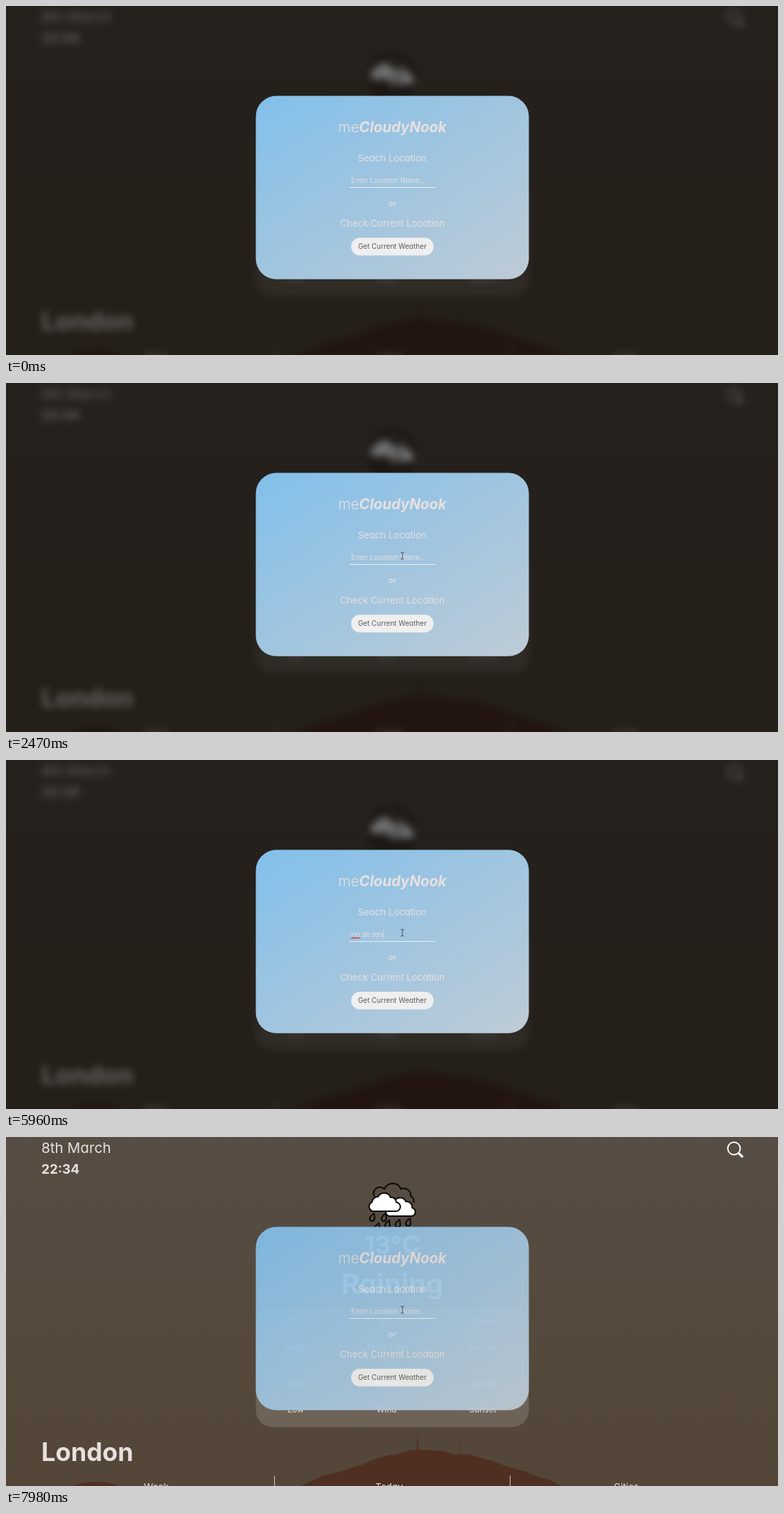
These frames come from a looping animation (1114 px wide and 503 px high, 8 s). An HTML page:

```html
<!DOCTYPE html>
<html lang="en">
<head>
<meta charset="utf-8">
<title>Weather search</title>
<style>
  html, body { margin: 0; width: 100%; height: 100%; overflow: hidden; background: #25211d; }
  svg { display: block; width: 100%; height: 100%; }
  /* cv11 is the round single-storey "a" */
  text { font-family: Inter, "Open Sans", sans-serif; font-feature-settings: "cv11"; fill: #e8e0df; white-space: pre; }
  .mid { text-anchor: middle; }
  .bold { font-weight: 700; }
  .dimmed { filter: blur(5.5px) brightness(.43); }
  .outline { stroke: #0b0908; stroke-width: 2; stroke-linejoin: round; }
</style>
</head>
<body>
<svg viewBox="0 0 1114 503">
  <defs>
    <linearGradient id="dusk" x2="0" y2="1">
      <stop stop-color="#574d44"/><stop offset="1" stop-color="#534637"/>
    </linearGradient>
    <linearGradient id="sky" x2="1" y2="1">
      <stop stop-color="#82bfea"/><stop offset="1" stop-color="#becbd5"/>
    </linearGradient>
    <path id="drop" d="M3-6C-2-2-4 0-3 3-1 7 4 5 4 1z"/>
  </defs>

  <g id="scene">
    <rect x="-40" y="-40" width="1194" height="583" fill="url(#dusk)"/>
    <g fill="#502f23">
      <path d="M425 543V503L440 496 458 488 476 484 495 478 512 473 530 465 550 459 566 457 575 453 590 451 612 451 632 453 645 457 668 457 690 464 700 466 715 472 730 477 750 482 768 490 785 494 800 503V543z"/>
      <path d="M95 543V503Q134 490 162 503V543z"/>
      <path d="M592.5 452L593.3 427H594.2L595.5 452zM654 458V441H655V458z" opacity=".8"/>
    </g>
    <text x="51" y="23" font-size="20.7">8th March</text>
    <text x="51" y="53" font-size="18.9" class="bold">22:34</text>
    <g fill="none" stroke="#fff" stroke-linecap="round">
      <circle cx="1050.5" cy="16.5" r="9" stroke-width="2"/>
      <path d="M1058 24L1062.3 28.2" stroke-width="3.2"/>
    </g>
    <g class="outline" fill="none">
      <path d="M533 88a9 9 0 0 1 13-13a13 13 0 0 1 24 0a10 10 0 0 1 14 10a8 8 0 0 1 4 10"/>
      <path fill="#fff" d="M553 114a6 6 0 0 1-2-11a8 8 0 0 1 9-9a9 9 0 0 1 17-1a8 8 0 0 1 9 9a6.2 6.2 0 0 1 0 12z"/>
      <path fill="#fff" d="M529 107a7 7 0 0 1-1-13a9 9 0 0 1 9-8a10 10 0 0 1 18 1a7 7 0 0 1 8 7a6.5 6.5 0 0 1-1 13z"/>
      <use href="#drop" x="528" y="116"/><use href="#drop" x="545" y="116"/>
      <use href="#drop" x="535" y="130"/><use href="#drop" x="550" y="126"/>
      <use href="#drop" x="565" y="125"/><use href="#drop" x="580" y="123"/>
    </g>
    <text x="557" y="168" font-size="36" class="mid bold">13°C</text>
    <text x="557.5" y="226" font-size="39.8" class="mid bold">Raining</text>
    <rect x="360.5" y="245" width="394" height="173" rx="24" fill="#fff" opacity=".15"/>
    <g id="details" font-size="12" class="mid"></g>
    <text x="51" y="467" font-size="36.2" class="bold">London</text>
    <g font-size="13.5" class="mid">
      <text x="217" y="509">Week</text><text x="553" y="509">Today</text><text x="895" y="509">Cities</text>
    </g>
    <path d="M387.5 488V543M727.5 488V543" stroke="#d2c9c4"/>
  </g>

  <g id="card">
    <rect x="360.5" y="129.5" width="394" height="264.3" rx="29.5" fill="url(#sky)"/>
    <text x="557.5" y="182" font-size="20.8" class="mid"><tspan font-weight="300">me</tspan><tspan class="bold" font-style="italic">CloudyNook</tspan></text>
    <text x="557.5" y="223.7" font-size="13.4" class="mid">Seach Location</text>
    <text id="hint" x="498" y="254.7" font-size="9.95">Enter Location Name...</text>
    <text id="typed" x="498" y="254.7" font-size="10.3"></text>
    <rect id="spelling" x="498" y="255.6" height="1.6" fill="#dc4038"/>
    <rect id="caret" y="244" width=".8" height="14" fill="#e8e0df"/>
    <rect x="495.5" y="261" width="124.5" height="1" fill="#f0eeee"/>
    <text x="557.5" y="287.5" font-size="11" font-weight="500" class="mid">or</text>
    <text x="557.5" y="317.6" font-size="13.4" class="mid">Check Current Location</text>
    <rect x="498" y="334" width="119" height="25.5" rx="12.75" fill="#efefef"/>
    <text x="557.5" y="350.4" font-size="10.1" class="mid" style="fill:#5c5c5c">Get Current Weather</text>
  </g>

  <circle id="click" cx="570" cy="248" r="8.3" fill="none" stroke="#444" stroke-width="1.2"/>
  <g id="pointer">
    <path id="arrow" d="M.5.5V10L2.7 8 4.2 11.4 5.6 10.8 4.2 7.5H7z" fill="#111" stroke="#fff" stroke-width=".7"/>
    <path id="beam" d="M-2.5-5Q0-5 0-3.5Q0-5 2.5-5M0-4V4M-2.5 5Q0 5 0 3.5Q0 5 2.5 5" fill="none" stroke="#4b4f52"/>
  </g>
</svg>
<script>
const LOOP = 8000, CLOSE = 7900, FADE = 7980;
const PHRASE = "rio de janeiro";
const keyTimes = [2810, 3550, 3820, 4220, 4560, 4830, 5100, 5360, 5700, 5960, 6630, 6890, 7160, 7360];
const caretSpans = [[1930, 2470], [2810, 3340], [3550, 6490], [6630, CLOSE]];
const $ = id => document.getElementById(id);
const show = (id, on) => { $(id).style.display = on ? "" : "none"; };

const columns = [
  [418, "20C", "High", "20C", "Low"],
  [549, "8C", "Feels Like", "6mph", "Wind"],
  [688, "17:48", "Sunrise", "06:38", "Sunset"]
];
const rows = [271, 307, 360, 397];
$("details").innerHTML = columns.map(([x, ...labels]) =>
  labels.map((label, i) => `<text x="${x}" y="${rows[i]}">${label}</text>`).join("")).join("");

function pointerAt(t) {
  if (t < 520) return [858, 403];
  if (t < 790) return [739, 345];
  const step = Math.min(10, Math.floor((t - 790) * 9 / 600 + 1e-6) + 1);
  const p = 1 - (1 - step / 10) ** 1.6;
  return [739 - 167 * p, 345 - 96 * p];
}

function drawInput(t) {
  const count = t < CLOSE ? keyTimes.filter(k => k <= t).length : 0;
  const typed = $("typed");
  typed.textContent = PHRASE.slice(0, count);
  show("hint", count === 0);
  show("caret", caretSpans.some(([a, b]) => t >= a && t < b));
  $("caret").setAttribute("x", 498 + (count ? typed.getComputedTextLength() : 0));
  show("spelling", count > 3);
  if (count > 3) $("spelling").setAttribute("width", typed.getSubStringLength(0, 3));
}

function drawPointer(t) {
  const [x, y] = pointerAt(t);
  const overInput = x < 620 && y < 262;
  show("pointer", t >= 450);
  show("arrow", !overInput);
  show("beam", overInput);
  show("click", t >= 1860 && t < 2130);
  $("pointer").setAttribute("transform", `translate(${x} ${y})`);
}

function frame() {
  const t = performance.now() % LOOP;
  $("scene").classList.toggle("dimmed", t < CLOSE);
  $("card").style.opacity = t < FADE ? 1 : .93;
  drawInput(t);
  drawPointer(t);
  requestAnimationFrame(frame);
}
frame();
</script>
</body>
</html>
```
